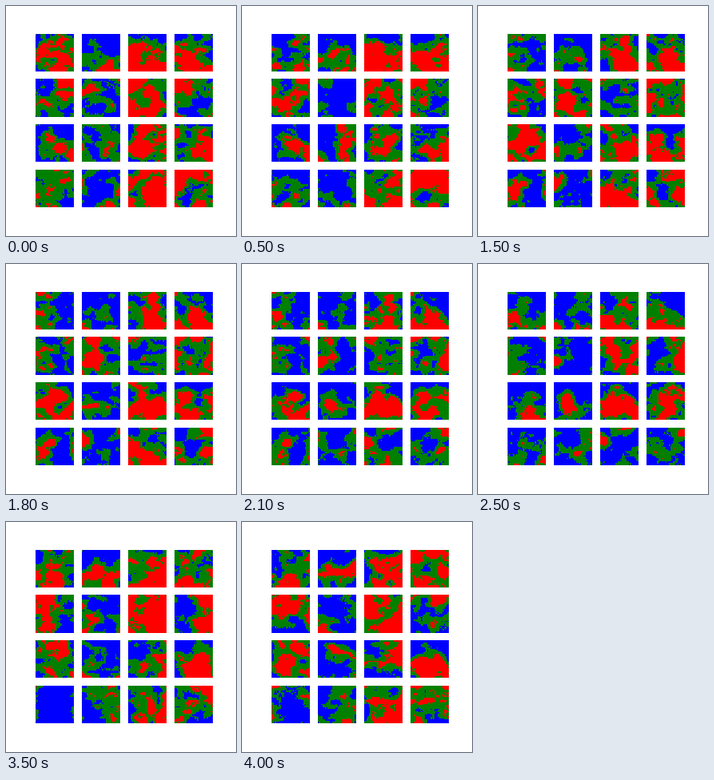
Write a matplotlib script that moves like this. It is 288x288 px and loops after 4100 ms.

```python
import numpy as np
import matplotlib.pyplot as plt
from matplotlib.animation import FuncAnimation
from matplotlib.colors import ListedColormap

FRAMES, INTERVAL = 41, 100
GRID, SIZE = 4, 32
NOISE_STEP = 8          # frames between two independent noise fields
LIMIT = 0.27            # half width of the middle (green) band

# Lasting tendencies of the panels
COLUMN_TINT = [-.08, -.25, .18, .08]    # blue below zero, red above
ROW_TILT = [.35, -.1, .25, .05]         # redder towards the bottom
ROW_BULGE = [.1, -.05, .3, 0]           # redder in the centre

# Rows, columns and strength of each noise scale, coarse to fine
SCALES = [(2, 2, .3), (4, 4, .42), (8, 6, .3), (15, 11, .17), (SIZE, SIZE, .05)]


def stretch(cells):
    """Matrix that resamples a coarse row of cells linearly to SIZE."""
    pos = np.linspace(0, cells - 1, SIZE)
    return np.clip(1 - abs(pos[:, None] - np.arange(cells)), 0, 1)


def noise(rng):
    """One rough field per panel, slightly streaked sideways."""
    total = 0
    for rows, cols, amp in SCALES:
        coarse = rng.normal(size=(GRID, GRID, rows, cols))
        total = total + amp * (stretch(rows) @ coarse @ stretch(cols).T)
    return total


def tendencies():
    axis = np.linspace(-1, 1, SIZE)
    x, y = np.meshgrid(axis, axis)
    bulge = 0.7 - x**2 - y**2
    rows = np.multiply.outer(ROW_TILT, y) + np.multiply.outer(ROW_BULGE, bulge)
    return rows[:, None] + np.reshape(COLUMN_TINT, (1, GRID, 1, 1))


rng = np.random.RandomState(4)
NOISES = [noise(rng) for _ in range(FRAMES // NOISE_STEP + 2)]
BASE = tendencies()


def classes(i):
    """Class 0, 1 or 2 for every cell, turning from one noise to the next."""
    k, step = divmod(i, NOISE_STEP)
    angle = np.pi / 2 * step / NOISE_STEP
    field = BASE + np.cos(angle) * NOISES[k] + np.sin(angle) * NOISES[k + 1]
    return np.digitize(field, [-LIMIT, LIMIT]).reshape(-1, SIZE, SIZE)


fig, axes = plt.subplots(GRID, GRID, figsize=(4, 4), dpi=72)
fig.subplots_adjust(left=.125, right=.9, bottom=.125, top=.88,
                    wspace=.2, hspace=.2)
cmap = ListedColormap(["blue", "green", "red"])
images = []
for ax, data in zip(axes.flat, classes(0)):
    ax.axis("off")
    images.append(ax.imshow(data, cmap=cmap, vmin=0, vmax=2,
                            interpolation="nearest"))


def draw(i):
    for image, data in zip(images, classes(i)):
        image.set_data(data)
    return images


anim = FuncAnimation(fig, draw, frames=FRAMES, interval=INTERVAL,
                     init_func=lambda: draw(0), repeat=True, repeat_delay=0)
plt.show()
```
